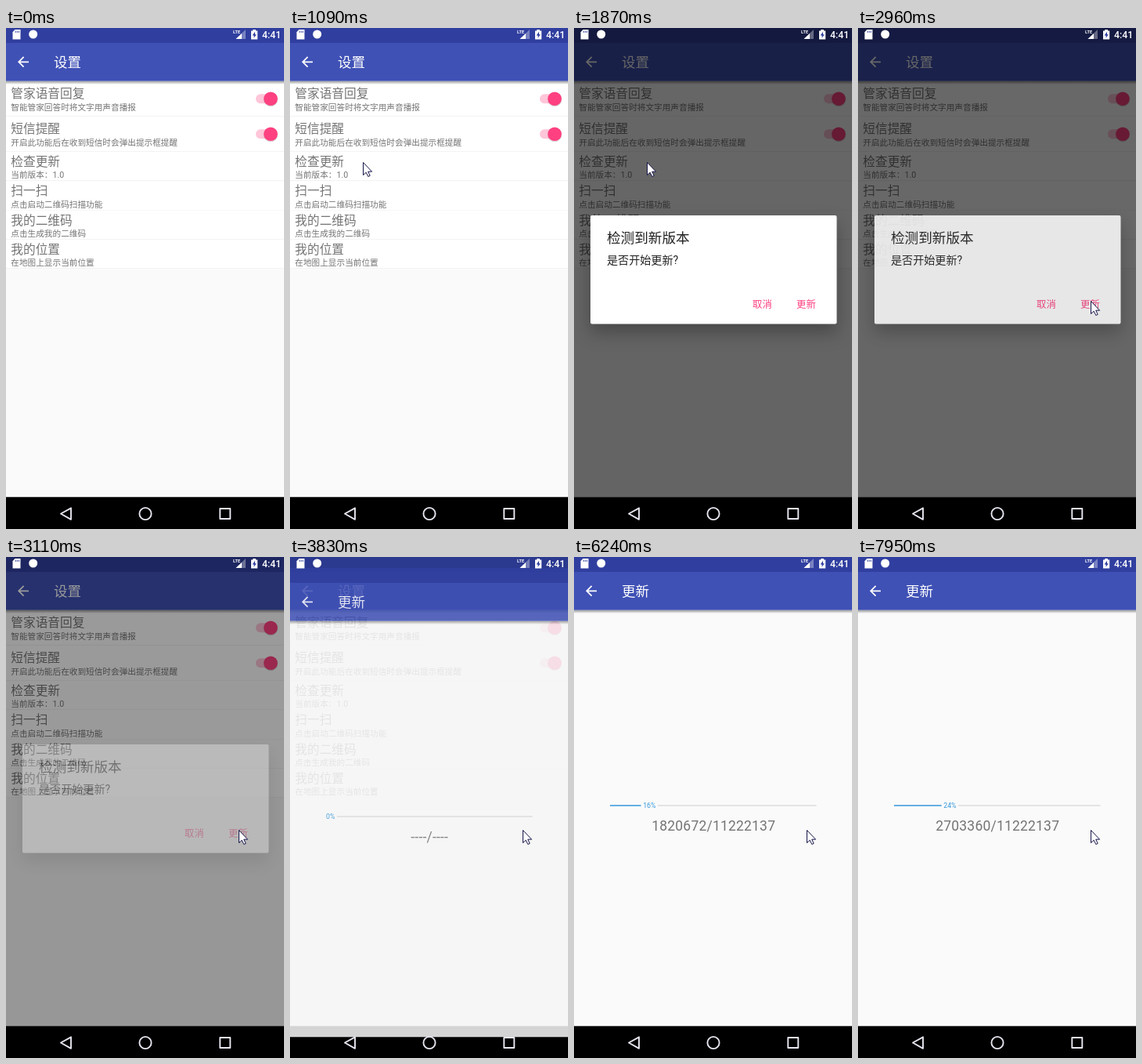
These frames come from a looping animation (355x639 px, 8000 ms). An HTML page:

```html
<!DOCTYPE html>
<html lang="zh-CN">
<head>
<meta charset="utf-8">
<title>设置</title>
<style>
  html, body { margin: 0; width: 100%; height: 100%; overflow: hidden; background: #000; }
  svg { display: block; width: 100vw; height: 100vh; overflow: hidden; }
  text { font-family: Roboto, "Noto Sans CJK SC", "Noto Sans CJK", sans-serif; white-space: pre; }
  #dialog { filter: drop-shadow(0 11px 11px rgba(0, 0, 0, .28)); }
</style>
</head>
<body>
<svg id="stage" viewBox="0 0 355 639" xmlns="http://www.w3.org/2000/svg"></svg>
<script>
const LOOP = 8000;
const TICK = 77.8;
const TOTAL = 11222137;
const BLOCK = 2048;
const BAR = { x: 46, w: 263.6, y: 317, gap: 2.6 };
const NAV = 598.5;
const GREY = '#757575', PINK = '#FF4081', BLUE = '#3498DB';

// CJK glyphs are centred about .38em above the baseline.
const cjk = (s, x, cy, size, fill) =>
  `<text x="${x}" y="${cy + size * .38}" font-size="${size}" fill="${fill}">${s}</text>`;
const rect = (x, y, w, h, fill, extra = '') =>
  `<rect x="${x}" y="${y}" width="${w}" height="${h}" fill="${fill}" ${extra}/>`;

const screen = (id, title, content) => `<g id="${id}">
  ${rect(0, 0, 355, NAV, '#fafafa')}
  ${content}
  ${rect(0, 67.6, 355, 4.4, 'url(#fall)')}
  ${rect(0, 0, 355, 19, '#303F9F')}
  ${rect(0, 19, 355, 48.6, '#3F51B5')}
  <path transform="translate(11.5 32.8) scale(.875)" fill="#fff"
    d="M20 11H7.83l5.59-5.59L12 4l-8 8 8 8 1.41-1.41L7.83 13H20z"/>
  ${cjk(title, 61, 43.5, 17.5, '#fff')}
  ${rect(0, NAV, 355, 639 - NAV, '#000')}</g>`;

const toggle = y =>
  rect(319, y - 6, 26, 12, PINK, 'rx="6" opacity=".3"') +
  `<circle cx="338" cy="${y + .8}" r="9.2" opacity=".15"/>
   <circle cx="338" cy="${y}" r="8.8" fill="${PINK}"/>`;

const ROWS = [
  ['管家语音回复', '智能管家回答时将文字用声音播报', true],
  ['短信提醒', '开启此功能后在收到短信时会弹出提示框提醒', true],
  ['检查更新', '当前版本：1.0'],
  ['扫一扫', '点击启动二维码扫描功能'],
  ['我的二维码', '点击生成我的二维码'],
  ['我的位置', '在地图上显示当前位置']
];

function list() {
  let top = 68, out = '';
  for (const [title, note, hasToggle] of ROWS) {
    const h = hasToggle ? 45 : 37.3;
    const y = top + (hasToggle ? 15.2 : 12);
    out += rect(0, top, 355, h, '#fff') +
      rect(0, Math.round(top + h) - 1, 355, 1, '#f3f3f3') +
      cjk(title, 6.3, y, 15.7, GREY) +
      cjk(note, 6.3, y + 17.3, 10.65, GREY) +
      (hasToggle ? toggle(top + h / 2 - .2) : '');
    top += h;
  }
  return out;
}

const dialog = `<g id="dialog">
  ${rect(21, 239, 314.5, 138.5, '#fff', 'rx="2"')}
  ${cjk('检测到新版本', 42, 267.3, 17.6, '#212121')}
  ${cjk('是否开始更新?', 42, 295.7, 14.1, '#212121')}
  ${cjk('取消', 228, 352.5, 12.4, PINK)}
  ${cjk('更新', 284, 352.5, 12.4, PINK)}</g>`;

const download =
  rect(BAR.x, BAR.y - .75, 0, 1.5, BLUE, 'id="done"') +
  rect(BAR.x, BAR.y - .5, 0, 1, '#d0d0d0', 'id="rest"') +
  `<text id="percent" y="320" font-size="8.75" fill="${BLUE}"></text>
   <text id="count" x="178.2" y="348.5" font-size="17.5" letter-spacing=".2"
     text-anchor="middle" fill="${GREY}"></text>`;

const statusIcons = `
  <path d="M11.5 2H18.5V14.5H8.5V5.2z" fill="#fff"/>
  <path d="M12.2 3.6v2.4M14.3 3.6v2.4M16.4 3.6v2.4" stroke="#303F9F" stroke-width=".9"/>
  <circle cx="34.7" cy="8" r="5.5" fill="#fff"/>
  <text x="290" y="7" font-size="5.6" font-weight="700" fill="#fff">LTE</text>
  <path d="M306 2V14H293.5z" fill="#fff" opacity=".35"/>
  <path d="M301 7V14H293.5z" fill="#fff"/>
  <path d="M315.3 2h3.6v1.4h2.3v11h-8.2v-11h2.3z" fill="#fff"/>
  <path d="M318 4.8l-3.4 4.6h2v3.4l3.2-4.6h-1.8z" fill="#303F9F"/>
  <text x="327" y="13" font-size="12.4" font-weight="500" fill="#fff">4:41</text>`;

const navIcons = `<g fill="none" stroke="#e6e6f0" stroke-width="1.9" stroke-linejoin="round">
  <path d="M70 619.5L83 612.3V626.8z"/>
  <circle cx="178" cy="619.5" r="7.6"/>
  <rect x="273.3" y="613" width="13" height="13"/></g>`;

document.getElementById('stage').innerHTML = `
  <defs><linearGradient id="fall" x2="0" y2="1">
    <stop offset="0" stop-opacity=".4"/><stop offset="1" stop-opacity="0"/>
  </linearGradient></defs>
  ${screen('settings', '设置', list())}
  ${rect(0, 0, 355, NAV, '#000', 'id="scrim"')}
  ${dialog}
  ${screen('update', '更新', download)}
  ${statusIcons}${navIcons}
  <path id="cursor" d="M.5 .5V16.6L4.2 13.2L6.8 18.5L9.2 17.4L6.7 12.2H11.6z"
    fill="#fff" stroke="#141448"/>`;

const el = id => document.getElementById(id);
const set = (id, attrs) => {
  for (const name in attrs) el(id).setAttribute(name, attrs[name]);
};
const show = (id, opacity) => {
  el(id).style.display = opacity > 0 ? '' : 'none';
  el(id).setAttribute('opacity', opacity);
};
const move = (id, x, y) =>
  set(id, { transform: `translate(${Math.round(x)} ${Math.round(y)})` });

const mix = (a, b, u) => a + (b - a) * u;
const easeInOut = u => u * u * (3 - 2 * u);
const curve = (a, b, c, u) => mix(mix(a, b, u), mix(b, c, u), u);

// Progress of a move in n visible steps: 1/n at start, 1 at end.
function steps(t, start, end, n) {
  if (t < start) return 0;
  const k = Math.floor((t - start) / (end - start) * (n - 1) + .01);
  return Math.min(1, (k + 1) / n);
}

function drawCursor(t) {
  show('cursor', t >= 550 ? 1 : 0);
  // Both paths swing slightly past their goal and settle.
  if (t < 1950) {
    const u = easeInOut((steps(t, 550, 1090, 8) * 8 - 1) / 7);
    move('cursor', curve(220, 20, 93, u), curve(526, 171, 171, u));
  } else {
    const u = easeInOut(steps(t, 1950, 2560, 9));
    move('cursor', curve(93, 320, 297, u), curve(171, 402, 348, u));
  }
}

function drawDialog(t) {
  const enter = steps(t, 1720, 1870, 3);
  // The last quarter of the exit comes after a stall.
  const leave = t < 3510 ? .75 * steps(t, 2960, 3110, 3) : 1;
  show('scrim', .6 * enter ** 1.6 - .5 * leave ** 3.1);
  show('dialog', enter ** .55 - leave ** 1.35);
}

function drawUpdate(t) {
  const u = steps(t, 3660, 4060, 6);
  show('update', Math.min(1, 1.7 * u));
  move('update', 0, 48 * (1 - u) ** 1.8);
}

// Blocks received, at a rate that slows down after the first seconds.
function blocks(t) {
  const points = [[4150, 132], [4990, 526], [6237, 889], [7948, 1320]];
  const i = Math.max(1, points.findIndex(p => p[0] > t));
  const [t0, v0] = points[i - 1], [t1, v1] = points[i];
  return Math.round(mix(v0, v1, Math.max(0, (t - t0) / (t1 - t0))));
}

function drawProgress(t) {
  const started = t >= 4060;
  const ticked = 5070 + Math.floor((t - 5070) / TICK) * TICK;
  const bytes = started ? blocks(Math.min(ticked, 7947.9)) * BLOCK : 0;
  const percent = Math.floor(bytes / TOTAL * 100);
  const label = percent + '%';
  const x = BAR.x + BAR.w * percent / 100;
  // Digit and percent-sign advances of the label font.
  const labelWidth = 8.75 * (.5615 * (label.length - 1) + .73);
  const restX = x + labelWidth + BAR.gap;
  el('percent').textContent = label;
  el('count').textContent = started ? bytes + '/' + TOTAL : '----/----';
  set('percent', { x });
  set('done', { width: Math.max(0, x - BAR.gap - BAR.x) });
  set('rest', { x: restX, width: BAR.x + BAR.w - restX });
}

function draw(t) {
  drawCursor(t);
  drawDialog(t);
  drawUpdate(t);
  drawProgress(t);
}

const start = performance.now();
function tick() {
  draw((performance.now() - start) % LOOP);
  requestAnimationFrame(tick);
}
tick();
</script>
</body>
</html>
```
